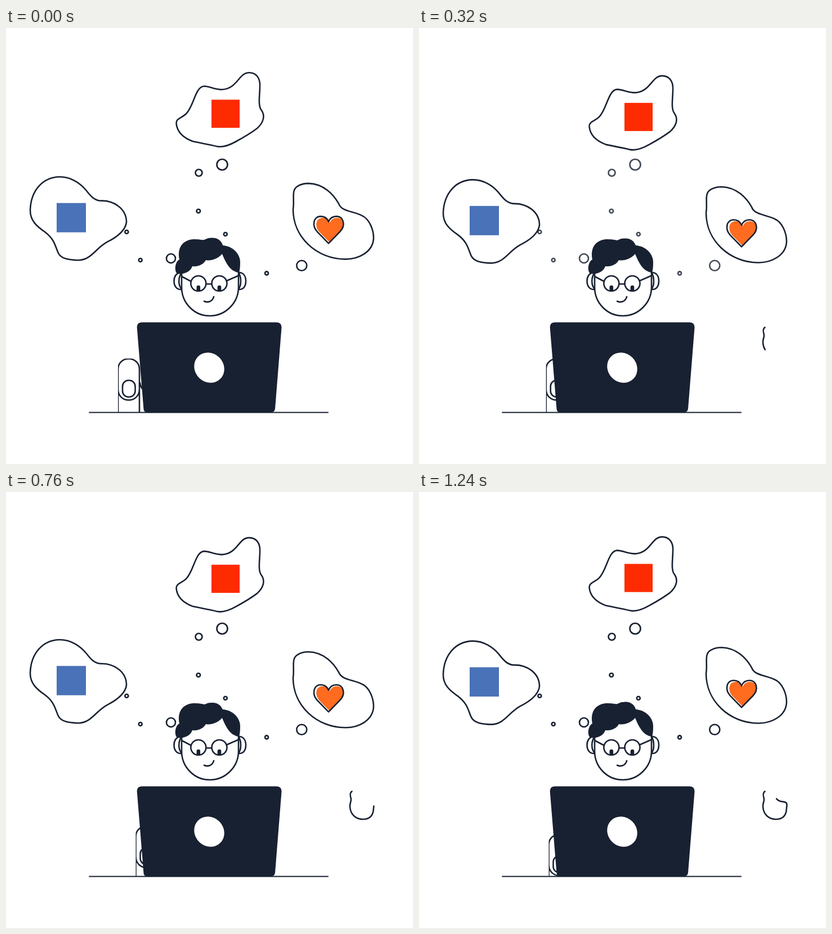
Recreate the animation shown at these times as an HTML page. Size 723 by 774 pixels, loop 1.28 s.

```html
<!DOCTYPE html>
<html lang="en">
<head>
<meta charset="utf-8">
<title>Thinking at the laptop</title>
<style>
  html, body { margin: 0; width: 100%; height: 100%; overflow: hidden; background: #fff; }
  svg { display: block; width: 100vw; height: 100vh; }
  .line { fill: none; stroke: #182131; stroke-width: 2.6; stroke-linecap: round; stroke-linejoin: round; }
  .ink { fill: #182131; }
  .paper { fill: #fff; }
</style>
</head>
<body>
<svg viewBox="0 0 723 774">
  <defs>
    <clipPath id="aboveTable"><rect width="723" height="682"/></clipPath>
    <clipPath id="handEdge"><rect x="199" y="586.7" width="60" height="140"/></clipPath>
    <path id="heart" d="M573 382.500L553 362C543 351 546 334.500 559 334.500C567 334.500 571 339 573 344C575 339 579 334.500 587 334.500C600 334.500 604 351 593 362Z"/>
  </defs>

  <g id="bubbles" class="line">
    <circle cx="384" cy="242.500" r="9.500"/>
    <circle cx="342.500" cy="257" r="6"/>
    <circle cx="341.800" cy="325" r="3.300"/>
    <circle cx="389.800" cy="366" r="3"/>
    <circle cx="214.300" cy="362" r="3"/>
    <circle cx="238.700" cy="412" r="3"/>
    <circle cx="293" cy="409" r="8"/>
    <circle cx="463" cy="435.400" r="3"/>
    <circle cx="525.300" cy="421.800" r="9"/>
  </g>

  <g id="topCloud">
    <path class="line" d="M432 79C444 79 452 88 451 104C451 118 447 138 454 146C461 156 457 168 446 178C434 187 420 195 409 201C395 209 385 212 375 210C358 206 345 204 332 201C316 195 304 185 302.500 169C302 160 312 160 320 152C334 138 336 104 352 103C362 103 370 109 384 109C412 107 413 79 432 79Z"/>
    <rect x="365" y="127" width="50" height="50" fill="#ff2b00"/>
  </g>

  <g id="leftCloud">
    <path class="line" d="M95 264.500C115 264 132 276 142 288C150 298 156 306 168 307C190 306 214 320 214 345C212 360 196 372 180 380C158 392 152 412 128 412.500C112 412 98 410 93 400C88 390 87 376 70 363C54 352 43 342 43 324C44 288 66 265 95 264.500Z"/>
    <rect x="90" y="311" width="52" height="52" fill="#4a72b8"/>
  </g>

  <g id="rightCloud">
    <path class="line" d="M538 276C565 277 582 296 591 312C596 326 616 325 632 333C646 339 653 359 653 373C652 398 626 411 602 410.500C552 410 510 372 510 322C513 304 506 288 518 281C524 277 531 276 538 276Z"/>
    <use href="#heart" fill="#ff6b1f" transform="translate(48 29.300) scale(.92)"/>
    <use href="#heart" class="line"/>
  </g>

  <g id="head" class="line">
    <path d="M312 434C302 434 298.500 442 298.500 449C298.500 458 303 465 312 464M311 436C306 443 306 456 311 462M413 434C423 434 426 442 426 449C426 458 422 465 413 464M414 436C418 443 418 456 414 462"/>
    <path class="paper" d="M312 430V460C312 488 334 511 362 511S413 488 413 460V430"/>
    <circle cx="341.800" cy="453.500" r="13.500"/>
    <circle cx="379" cy="453.500" r="13.500"/>
    <path d="M355.500 454.500H365.500M312 441L329 450M391.500 449L412 440M352 485C358 488 367 486 369 477"/>
    <g class="ink" stroke="none">
      <rect x="338.500" y="457" width="6.600" height="11" rx="3"/>
      <rect x="375.700" y="457" width="6.600" height="11" rx="3"/>
      <path d="M385 386C402 387 416 400 416 416Q416 428 414 434C398 433 390 416 383.500 400Z"/>
      <path d="M384 401C376 410 364 414 355 412C351 420 341 424 331 423C328 432 317 438 304 436C298 430 301 414 308 411C304 392 312 376 334 375Q350 375 361 380L386 386Z"/>
      <path id="curl" d="M346 376C354 378 354 372.500 365 372.500C378 372 385 380 386 390L350 400Z"/>
    </g>
  </g>

  <g clip-path="url(#aboveTable)">
    <g id="hand"><g class="line" clip-path="url(#handEdge)">
      <path d="M199 720V606C199 581 237 581 237 606V720M199 641C199 667 237 667 237 641M238 630Q239 638 244 642"/>
      <rect x="207" y="625.500" width="22.500" height="29.500" rx="10.500"/>
    </g></g>
  </g>
  <path class="line" style="stroke-width:2" d="M148 682.500H572"/>
  <path class="ink" d="M242 522.500H480Q490 522.500 489.500 532L478 676Q477 682.500 470 682.500H252Q245 682.500 244.500 677L232.700 532Q232 522.500 242 522.500Z"/>
  <ellipse class="paper" rx="28" ry="25.500" transform="translate(361 603) rotate(45)"/>

  <path id="squiggle" class="line" d="M614.500 531.500C610 534 611.500 540 612.800 544C614 549 610.500 551 611 559C612 573 622 581 634 581C645 581 651 575 652.500 566C652.800 562 653.500 558 653.500 555C653 550 649 550 644 549.500C639 548.500 637 547 635 544.500"/>
</svg>
<script>
const LOOP = 1280, STEP = 40, SWAY = 1220, DRAW_SPEED = 0.1295;
const $ = id => document.getElementById(id);

const progress = (t, start, end) => Math.min(1, Math.max(0, (t - start) / (end - start)));
const easeInOut = u => u * u * (3 - 2 * u);
const easeIn = u => u ** 3;
const bump = u => Math.sin(Math.PI * u);
const sway = (t, middle, size, delay) => middle + size * Math.sin(2 * Math.PI * (t - delay) / SWAY);
const move = (id, x, y) => $(id).setAttribute('transform', `translate(${x} ${y})`);

function draw() {
  const t = Math.floor(performance.now() % LOOP / STEP) * STEP;

  move('topCloud', 0, sway(t, 2.6, 3.9, 125));
  move('leftCloud', 0, sway(t, 0.4, 4.5, 30));
  move('rightCloud', 0, sway(t, 4.8, 5, 275));
  move('curl', 0, 1.5 * bump(t / LOOP));

  // The hand slides behind the laptop, then sinks below the table edge.
  move('hand', 31.5 * easeInOut(progress(t, 0, 425)), 20.5 * easeIn(progress(t, 440, 920)));
  $('bubbles').style.opacity = 1 - 0.2 * bump(progress(t, 0, 520));

  const squiggle = $('squiggle').style;
  squiggle.strokeDasharray = `${t * DRAW_SPEED} 400`;
  squiggle.visibility = t ? 'visible' : 'hidden';
  requestAnimationFrame(draw);
}
draw();
</script>
</body>
</html>
```
